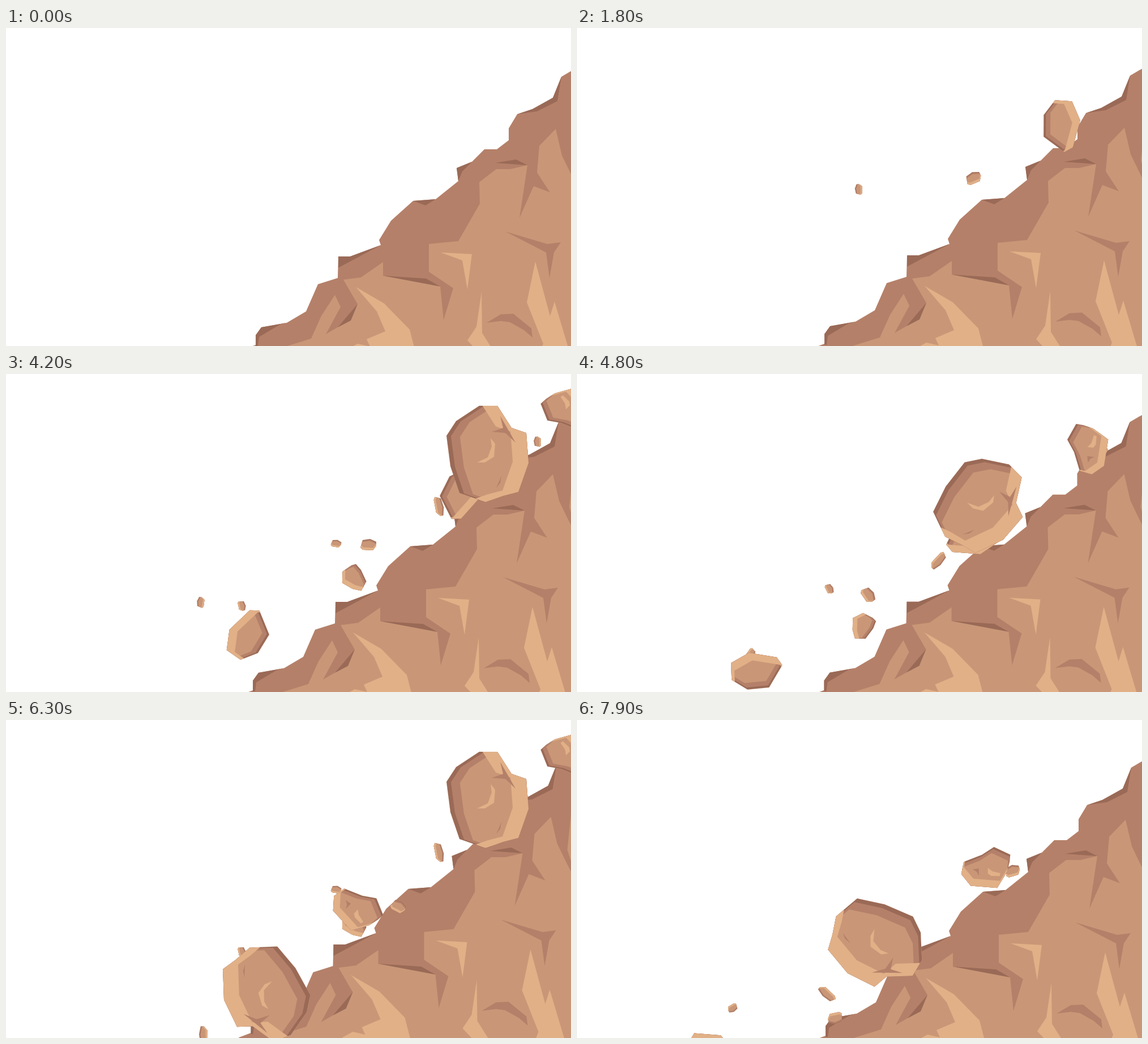
An HTML page with a canvas that plays this animation: 998x561 px, repeating every 8 s.

```html
<!DOCTYPE html>
<html lang="en">
<head>
<meta charset="utf-8">
<title>Rockfall</title>
<style>
html, body { margin: 0; width: 100%; height: 100%; overflow: hidden; background: #fff; }
canvas { display: block; }
</style>
</head>
<body>
<canvas id="stage" width="998" height="561"></canvas>
<script>
const ctx = document.getElementById('stage').getContext('2d');
const LOOP = 8000, STEP = 100, WAVE = 2100, RUSH = 150;
const DARK = '#9a6a57', MID = '#b58069', BASE = '#c99777', LIGHT = '#e1b087';

const poly = (color, points) => ({ color, path: new Path2D('M' + points + 'Z') });

const mountain = [
  poly(MID, '420,567 441,559 441,542 451,528 496,520 530,500 551,452 586,441 587,403 608,403 662,383 659,374 680,340 719,305 759,302 799,270 796,247 823,236 845,214 867,214 888,198 888,177 903,152 930,143 966,123 981,86 998,76 1030,60 1030,600 400,600'),
  poly(BASE, '440,580 497,561 539,548 557,508 581,471 591,492 565,540 586,528 609,516 621,487 596,444 627,440 666,413 666,437 767,456 773,515 790,459 747,430 747,381 799,376 837,310 836,272 866,249 891,249 921,242 907,335 932,279 961,290 938,255 942,208 971,178 982,225 998,258 1030,320 1030,600'),
  poly(BASE, '1012,120 1000,236 1030,330'),
  poly(DARK, '441,561 441,542 451,528 496,520 484,523 447,545 445,561'),
  poly(DARK, '587,403 608,403 662,383 587,423'),
  poly(DARK, '719,305 759,302 741,313'),
  poly(DARK, '796,247 823,236 806,253 799,270'),
  poly(DARK, '903,152 930,143 966,123 981,86 974,129 938,147'),
  poly(DARK, '666,437 742,442 767,456'),
  poly(DARK, '864,238 901,232 921,242'),
  poly(DARK, '621,487 609,516 586,528'),
  poly(MID, '882,359 956,381 980,378 968,396 960,441 954,396'),
  poly(MID, '849,520 874,505 896,504 928,530 930,546 915,533 890,519 874,517'),
  poly(LIGHT, '768,396 823,399 815,461 806,410'),
  poly(LIGHT, '618,457 668,486 713,532 728,590 600,590 603,567 621,557 643,562 637,549 670,535 655,500'),
  poly(LIGHT, '840,466 841,538 860,568 831,568 815,551 831,527'),
  poly(LIGHT, '935,412 961,508 969,483 998,580 940,580 949,557 920,484')
];

// A rock is an outline around 0,0; its shading is the outline shifted along the light.
function stone(points, radius, lightDeg, marks = []) {
  const outline = new Path2D('M' + points + 'Z');
  const a = lightDeg * Math.PI / 180;
  const shifted = (color, part, path = new Path2D()) => {
    const d = radius * part;
    path.addPath(outline, new DOMMatrix().translate(d * Math.cos(a), d * Math.sin(a)));
    return { color, path };
  };
  const rim = shifted(LIGHT, -.35, new Path2D(outline));
  return { outline, rim, layers: [shifted(MID, .1), shifted(BASE, .3)], marks };
}

const boulder = stone('-14,-84 18,-84 43,-45 69,-36 73,17 55,68 28,75 -3,86 -49,70 -65,23 -72,-31 -55,-57', 80, 5, [
  poly(MID, '23,-66 28,-45 8,-38 32,-36 50,-19'),
  poly(LIGHT, '6,-27 14,-17 12,6 -4,16 -18,16 1,7 8,-12'),
  poly(MID, '25,40 23,52 16,61')
]);
const lump = stone('-43,12 -39,-10 -7,-23 14,-37 43,-24 42,-11 38,6 21,35 -26,32', 38, 110, [
  poly(LIGHT, '4,0 12,6 26,9 25,14 10,14 4,10'),
  poly(MID, '-23,3 -12,1 -12,14 -16,7')
]);
const block = stone('-43,-22 0,-38 32,-17 43,14 25,38 -11,32 -44,-5', 42, 105);
const chunk = stone('-23,2 -15,-9 3,-23 21,-18 21,-2 15,18 -5,22 -19,9', 23, 25);
const pebble = stone('-14,5 -10,-8 3,-10 14,-5 14,2 8,10 -10,9', 12, 100);

// Place, speed and acceleration at the start time; spin in degrees per second.
const rock = (shape, scale, start, place, speed, accel, angle, spin) =>
  ({ shape, scale, start, place, speed, accel, angle, spin });

const rocks = [
  rock(pebble, [.65, .65], 1800, [1031, 79], [-315, 135], [24.6, 1], -118, 80),
  rock(pebble, [.68, .65], 1100, [868, 174], [-541, -6], [16.7, 235], -115, 30),
  rock(pebble, [1, 1], 1100, [833, 200], [-183, 72], [-10, 29], -88, 88),
  rock(pebble, [1.25, .75], 3200, [988, 66], [-231, 171], [8, -4], -13, 90),
  rock(pebble, [.95, 1], 5800, [769, 266], [-153, 126], [2, -1], -20, 88),
  rock(chunk, [1, 1], 3200, [791, 210], [-173.5, 151], [-2.7, -3], 0, 103),
  rock(block, [1, 1], 1800, [856, 171], [-173, 134], [-2.4, -5.5], -123, 88),
  rock(lump, [1, 1], 4200, [992, 65], [-140, 108], [-18, 9], -136, 85.6),
  rock(pebble, [.65, .65], 3200, [869, 163], [-322, 138], [36, -2], -80, 87),
  rock(boulder, [1, 1], 4200, [850, 140], [-244.5, 141.5], [27.8, 10.3], 0, 75.5)
];

const shake = [
  [0, 0, 0], [1800, -4, -2], [3200, -12, 0], [4200, -5, -1],
  [5400, -4, -1.5], [6300, -8.5, -7], [7900, -2, -2]
];

function shakeAt(t) {
  const i = Math.max(1, shake.findIndex(k => k[0] >= t));
  const [t0, x0, y0] = shake[i - 1], [t1, x1, y1] = shake[i];
  const u = (1 - Math.cos(Math.PI * (t - t0) / (t1 - t0))) / 2;
  return [x0 + (x1 - x0) * u, y0 + (y1 - y0) * u];
}

function paint(parts) {
  for (const { color, path } of parts) {
    ctx.fillStyle = color;
    ctx.fill(path);
  }
}

function paintStone({ outline, rim, layers, marks }) {
  paint([{ color: DARK, path: outline }]);
  ctx.clip(outline);
  paint(layers);
  ctx.fillStyle = rim.color;
  ctx.fill(rim.path, 'evenodd');
  paint(marks);
}

function drawRock(r, s) {
  const [x, y] = r.place.map((p, i) => p + r.speed[i] * s + r.accel[i] * s * s);
  const entry = s < 0 ? RUSH * s * s : 0;
  ctx.save();
  ctx.translate(x + entry, y);
  ctx.rotate((r.angle + r.spin * s) * Math.PI / 180);
  ctx.scale(...r.scale);
  paintStone(r.shape);
  ctx.restore();
}

function draw(t) {
  ctx.fillStyle = '#fff';
  ctx.fillRect(0, 0, 998, 561);
  ctx.save();
  ctx.translate(...shakeAt(t));
  paint(mountain);
  ctx.restore();
  for (const r of rocks) {
    for (const start of [r.start, r.start + WAVE]) drawRock(r, (t - start) / 1000);
  }
}

const begin = performance.now();
function tick() {
  const t = (performance.now() - begin) % LOOP;
  draw(Math.floor(t / STEP) * STEP);
  requestAnimationFrame(tick);
}
tick();
</script>
</body>
</html>
```
